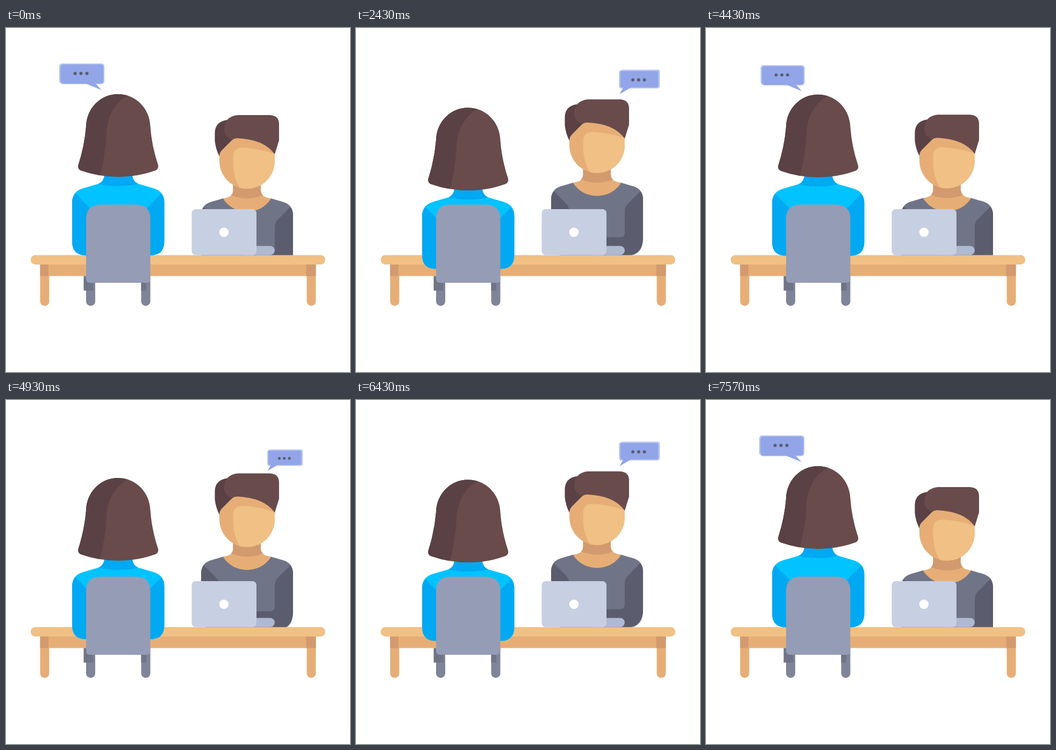
Animation, 640 px wide and 640 px high, one loop 8000 ms. Source, as an HTML page:

```html
<!DOCTYPE html>
<html lang="en">
<head>
<meta charset="utf-8">
<title>Desk conversation</title>
<style>
  html, body { margin: 0; width: 100%; height: 100%; overflow: hidden; background: #fff; }
  svg { display: block; width: 100vw; height: 100vh; }
</style>
</head>
<body>
<svg viewBox="0 0 640 640">
  <defs>
    <clipPath id="hairClip"><use href="#hair"/></clipPath>
  </defs>

  <g id="bubbleA">
    <path fill="#b3c1f2" d="M104 66H178Q183 67 183 71V99Q182 104 177 104.500H168L177.500 115.500L152 104.500H105Q99 102 99 98V71Q100 66 104 66Z"/>
    <path fill="#91a5e8" d="M106 68H176Q181 69 181 73V98Q180 103 176 103H166L177 115L149 103.500H106Q102 102 101.500 98V73Q102 69 106 68Z"/>
    <g fill="#5b5d6e"><circle cx="128.500" cy="84.500" r="3"/><circle cx="139.500" cy="84.500" r="3"/><circle cx="150.500" cy="84.500" r="3"/></g>
  </g>

  <g id="bubbleB">
    <path fill="#b9c6f4" d="M496 74.500H565Q568 75 568 78V107Q567 110 564 110.500H493Q490 109 490 106V79Q491 76 496 74.500Z"/>
    <path fill="#91a5e8" d="M495 77H563Q565 77.500 565 79.500V106Q564.500 108.500 562 108.500H513L491 121.500L498 108.500H495Q492.500 108 492.500 106V79.500Q493 77 495 77Z"/>
    <g fill="#5b5d6e"><circle cx="516.500" cy="94" r="3"/><circle cx="527.500" cy="94" r="3"/><circle cx="538.500" cy="94" r="3"/></g>
  </g>

  <g id="man">
    <path fill="#707487" d="M404 287L380 294Q363 300 363 318V397Q363 423 389 423H508Q534 420 534 391V318Q534 300 517 294L493 287Z"/>
    <path fill="#5b5d6e" d="M368 303L390 325Q397 332 397 342V388.500H491Q500 388.500 500 380V340Q500 332 506 326L529 303Q534 310 534 318V391Q532 420 505 423H389Q363 423 363 397V318Q363 310 368 303Z"/>
    <path fill="#e6ae76" d="M422.500 255V272Q422 282 413 285L404 287.500C413 302 429 311.500 448.500 311.500S484 302 493 287.500L484 285Q474.500 282 474 272V255Z"/>
    <path fill="#d29a6e" d="M422.500 250V272Q422.500 277 419 281Q432 287 448.500 287T478 281Q474 277 474 272V250Z"/>
    <path fill="#e6ae76" d="M397 198V217C397 246 420 269 448.500 269S500 246 500 217V190L430 168Z"/>
    <path fill="#f0c084" d="M500 204V217C500 246 477 269 448.500 269Q441 269 435 267.500Q422.500 248 422.500 218V210Q422.500 192.500 440 192.500Q470 194 500 204Z"/>
    <path fill="#5a4146" d="M412 141Q388.500 144 388.500 166V180Q390 195 397 209Q397 202 402 197L420 179Q424 175 430 175L440 150Z"/>
    <path fill="#694b4b" d="M432 132H491Q508 133 508 149V179L500 205Q480 177 430 175Q424 175 421 178Q406 173 406 158Q407 134 432 132Z"/>
  </g>

  <g id="table">
    <path fill="#e6ae76" d="M63.500 438H576.500V508.500A8.500 8.500 0 0 1 559.500 508.500V461.500H80.500V508.500A8.500 8.500 0 0 1 63.500 508.500Z"/>
    <path fill="#d29a6e" d="M63.500 438H79V461.500H63.500ZM558.500 438H576.500V461.500H558.500Z"/>
    <rect x="46" y="422.500" width="548" height="17.500" rx="8.500" fill="#f0c084"/>
  </g>

  <g id="laptop">
    <path fill="#afb9d2" d="M440 405.500H491.500A8.500 8.500 0 0 1 491.500 422.500H440Z"/>
    <rect x="345.500" y="337" width="120.500" height="85.500" rx="7.500" fill="#c7cfe2"/>
    <circle cx="405.500" cy="380" r="8.700" fill="#fff"/>
  </g>

  <g id="woman">
    <path fill="#00c3ff" d="M175 289L144 298Q123 304 123 324V397Q123 423 149 423H268.500Q294.500 423 294.500 397V324Q294.500 304 274 298L243 289Z"/>
    <path fill="#00a9f1" d="M129 308L162 341V423H149Q123 423 123 397V324Q123 315 129 308ZM288.500 308L256 341V423H268.500Q294.500 423 294.500 397V324Q294.500 315 288.500 308Z"/>
    <path fill="#00a9f1" d="M183 265V274Q182 285 172 290Q188 294 209 294T246 290Q236 285 235 274V265Z"/>
    <path id="hair" fill="#694b4b" d="M149 183C150 149 176 123 208.500 123S267 149 268.500 183Q271 219 283 255Q284.500 262 278 265Q245 277 209 277T139 265Q133 262 134.500 255Q146 219 149 183Z"/>
    <path fill="#5a4146" clip-path="url(#hairClip)" d="M228 125C203 137 188 165 187 195Q185 238 174 276L130 280V120H228Z"/>
  </g>

  <g id="chair">
    <path fill="#7f8499" d="M149 461H166V508.500A8.500 8.500 0 0 1 149 508.500ZM251.500 461H268.500V508.500A8.500 8.500 0 0 1 251.500 508.500Z"/>
    <path fill="#707487" d="M144.500 461.500H162.500V488.500H144.500ZM251.500 461.500H261V488.500H251.500Z"/>
    <path fill="#959cb5" d="M175 328.500H242.500Q268.500 329.500 268.500 355V467Q268.500 474 261.500 474H156Q149 474 149 467V355Q149 329.500 175 328.500Z"/>
  </g>
</svg>
<script>
  const HALF = 2000, STEP = HALF / 28;
  const START = 329, END = 1600;
  const $ = id => document.getElementById(id);
  const [man, woman, bubbleA, bubbleB] = ['man', 'woman', 'bubbleA', 'bubbleB'].map($);

  // cubic-bezier(.33, 0, 0, 1), solved by bisection
  function ease(x) {
    if (x <= 0) return 0;
    if (x >= 1) return 1;
    let lo = 0, hi = 1, u = 0.5;
    for (let i = 0; i < 24; i++) {
      u = (lo + hi) / 2;
      if (0.99 * u * (1 - u) ** 2 + u ** 3 < x) lo = u; else hi = u;
    }
    return u * u * (3 - 2 * u);
  }

  const shift = (el, y) => el.setAttribute('transform', `translate(0 ${y})`);
  const grow = (el, x, y, s) =>
    el.setAttribute('transform', `translate(${x} ${y}) scale(${s}) translate(${-x} ${-y})`);

  // 0: the woman speaks, 1: the man speaks
  function draw(time) {
    const t = Math.floor((time + 5) / STEP) * STEP + 0.01;
    const e = ease((t % HALF - START) / (END - START));
    const turn = Math.floor(t / HALF) % 2 ? 1 - e : e;
    shift(woman, 26 * turn);
    shift(man, 30 * (1 - turn));
    grow(bubbleA, 202, 195, 1 - turn);
    grow(bubbleB, 464, 189, turn);
  }

  const begin = performance.now();
  function tick() {
    draw(performance.now() - begin);
    requestAnimationFrame(tick);
  }
  draw(0);
  requestAnimationFrame(tick);
</script>
</body>
</html>
```
